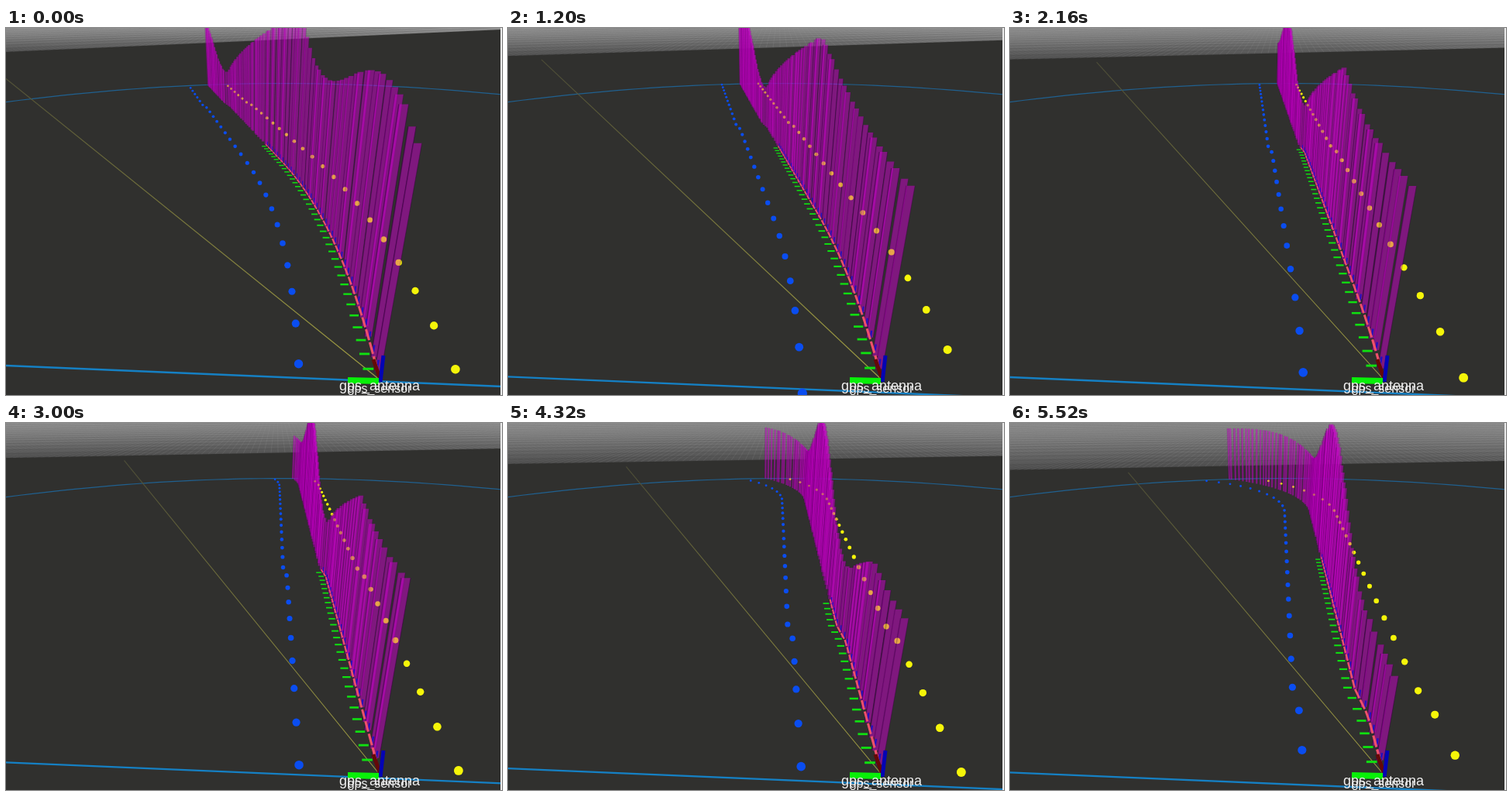
An HTML page with a canvas for the animation above (5.64 s loop, 640 by 474 pixels).

```html
<!DOCTYPE html>
<html lang="en">
<head>
<meta charset="utf-8">
<title>Track view</title>
<style>
  html, body { margin: 0; height: 100%; overflow: hidden; background: #30302e; }
  canvas { display: block; }
</style>
</head>
<body>
<canvas id="stage" width="640" height="474"></canvas>
<script>
const ctx = document.getElementById('stage').getContext('2d');
const W = 640, H = 474, LOOP = 5640, STEP = 120;
const CAR = { x: 2.07, z: 7.74 }, RANGE = 26.6, HALF_TRACK = 1.32;
const SEAM = 19.9, TURN = 35, SPACING = .335;

const clamp = (v, lo, hi) => Math.min(hi, Math.max(lo, v));
const random = i => { const v = Math.sin(i * 127.1 + 31.7) * 43758.5; return v - Math.floor(v); };

// The car rolls out: distance and its derivative, t in seconds
const travelled = t => -.29 + 3.96 * t - .0089 * t ** 3.5;
const carSpeed = t => 3.96 - .0311 * t ** 2.5;

// A bend that straightens, then a sharp left turn
const heading = s => clamp(.32 - .031 * s, 0, .31) - clamp((s - TURN) * .094, 0, 1.12);

// Centre line of the track, integrated from its heading
const DS = .05, S0 = -3, line = [];
for (let s = S0, x = 0, z = 0; s < 62; s += DS) {
  line.push({ x, z });
  x += Math.sin(heading(s)) * DS;
  z += Math.cos(heading(s)) * DS;
}

function trackPoint(s, offset = 0) {
  const f = (s - S0) / DS, i = Math.floor(f), a = line[i], b = line[i + 1], h = heading(s);
  return {
    x: a.x + (b.x - a.x) * (f - i) + Math.cos(h) * offset,
    z: a.z + (b.z - a.z) * (f - i) - Math.sin(h) * offset
  };
}

function conePosition(k) {
  if (k < 20) return 1.03 * k;
  return 20.3 + 1.07 * (k - 20) + .11 * Math.max(0, k - 33);
}

// Planned speed: accelerate from the current one, brake for the seam, then swing on
function plannedSpeed(s, t) {
  const u = s - travelled(t);
  if (s > SEAM) {
    const swing = Math.cos((s - 28) * 2 * Math.PI / 16.5);
    return 3.2 + 1.4 * swing * Math.exp(-Math.max(0, s - 28) / 8);
  }
  const wobble = 1.1 * Math.exp(-4 * t) * Math.cos((u - 2) * .55);
  const accelerating = Math.min(3.3, carSpeed(t)) - .1 * u + .045 * u * u + wobble;
  return Math.min(accelerating, Math.sqrt(3 + 2.1 * (SEAM - s)));
}

// Pitched pinhole camera: x to the right, z forward, h upward
function project(x, z, h = 0) {
  const w = z - .497 * h;
  return [(320 * z + 609 * x - 159 * h) / w, (3832 - 40 * z - 676 * h) / w];
}

function stroke(points, color, width) {
  ctx.beginPath();
  points.forEach(p => ctx.lineTo(...p));
  ctx.strokeStyle = color;
  ctx.lineWidth = width;
  ctx.stroke();
}

function dot(p, color) {
  ctx.beginPath();
  ctx.arc(...project(p.x, p.z), 46 / p.z, 0, 7);
  ctx.fillStyle = color;
  ctx.fill();
}

function drawFarGrid(left, right) {
  ctx.save();
  ctx.beginPath();
  [[0, 0], [W, 0], [W, right], [0, left]].forEach(p => ctx.lineTo(...p));
  ctx.clip();
  const shade = ctx.createLinearGradient(0, 0, 0, left);
  shade.addColorStop(0, '#949494');
  shade.addColorStop(1, '#484848');
  ctx.fillStyle = shade;
  ctx.fillRect(0, 0, W, left);
  for (let x = -900; x < 1600; x += 9)
    stroke([[x, left + (right - left) * x / W], [350, -40]], 'rgba(165,165,165,.22)', .7);
  for (let j = 0; j < 30; j++) {
    const k = 1 / (1 + j * .07);
    stroke([[0, (left + 40) * k - 40], [W, (right + 40) * k - 40]], 'rgba(40,40,40,.2)', .8);
  }
  ctx.restore();
}

function drawBar(p, height, seed) {
  const half = .05 + .02 * random(seed);
  const corners = [[-half, 0], [-half, height], [half, height], [half, 0]]
    .map(([dx, h]) => project(p.x + dx, p.z, h));
  ctx.beginPath();
  corners.forEach(c => ctx.lineTo(...c));
  ctx.fillStyle = 'rgba(205,0,205,.5)';
  ctx.fill();
  const edge = `rgba(50,0,60,${.2 + .4 * random(seed + .5)})`;
  stroke(corners.slice(0, 2), edge, 12 / p.z);
  stroke(corners.slice(2), edge, 8 / p.z);
}

function drawPose(p, next) {
  const at = project(p.x, p.z), size = 24 / p.z;
  stroke([project(p.x - .06, p.z), project(p.x - .24, p.z)], '#0fe010', size);
  stroke([at, project(p.x, p.z, .2)], '#2010c0', size * .8);
  stroke([at, project(next.x, next.z)], '#f0506a', size * 1.1);
}

function label(text, size, y) {
  ctx.font = `${size}px "Liberation Sans", Arial, sans-serif`;
  ctx.fillText(text, 482, y);
}

function draw(t) {
  const s0 = travelled(t), yaw = heading(s0) - .045, car = trackPoint(s0);
  const sin = Math.sin(yaw), cos = Math.cos(yaw);

  function view(s, offset = 0) {
    const p = trackPoint(s, offset - .12 * clamp((s - 19.5) / .8, 0, 1));
    const dx = p.x - car.x, dz = p.z - car.z;
    const x = dx * cos - dz * sin, z = dx * sin + dz * cos;
    return { x: x + CAR.x, z: z + CAR.z, near: Math.hypot(x, z) < RANGE };
  }
  function cones(offset, color) {
    for (let k = 0; k < 52; k++) {
      const s = conePosition(k), p = view(s, offset);
      if (s > s0 - 1.2 && p.near) dot(p, color);
    }
  }

  ctx.fillStyle = '#30302e';
  ctx.fillRect(0, 0, W, H);
  const left = 31 + 4 * t + .25 * t * t, right = 2 + 12.4 * t - .7 * t * t;
  drawFarGrid(left, right);

  const ring = [];
  for (let a = -1.2; a <= 1.2; a += .03)
    ring.push(project(CAR.x + RANGE * Math.sin(a), CAR.z + RANGE * Math.cos(a)));
  stroke(ring, '#20608f', 1.2);
  const axis = 445 - 9 * Math.cos(2 * Math.PI * t / 3.4);
  stroke([[0, axis], [W, axis + 27]], '#1580c4', 2.4);

  const originX = 125.5 - 600 * yaw, originY = left + (right - left) * originX / W + 6;
  const ray = ctx.createLinearGradient(originX, originY, 483, 455);
  ray.addColorStop(0, '#4c4c36');
  ray.addColorStop(1, '#a3a042');
  stroke([[originX, originY], [483, 455]], ray, 1.1);

  cones(HALF_TRACK, '#f5f50a');
  const phase = .85 + .16 * t;
  const planned = Math.max(Math.min(12.3, SEAM - s0), 1.4 * s0 - 15);
  for (let j = 150; j > -3; j--) {
    const s = SPACING * (j + phase + .6 * (random(j) - .5)), p = view(s);
    if (s > s0 + .05 && p.near) drawBar(p, plannedSpeed(s, t), j);
  }
  ctx.globalAlpha = .35;
  cones(HALF_TRACK, '#f5f50a');
  ctx.globalAlpha = 1;
  for (let j = 150; j > -3; j--) {
    const s = SPACING * (j + phase), u = s - s0;
    if (u > .22 && u < planned) drawPose(view(s), view(s + .28));
  }
  cones(-HALF_TRACK, '#0a4df0');

  // Vehicle axes and frame names
  stroke([[483, 454], [474, 428]], '#640808', 5);
  stroke([[483, 457], [487, 423]], '#0404b4', 5);
  stroke([[441, 455], [481, 456]], '#08f008', 8);
  ctx.fillStyle = '#f0f0f0';
  ctx.textAlign = 'center';
  label('gps_antenna', 18, 468);
  label('gps_sensor', 16, 471);

  ctx.fillStyle = '#e8e8e8';
  ctx.fillRect(638, 0, 2, H);
}

const start = performance.now();
function tick() {
  const t = (performance.now() - start) % LOOP;
  draw(Math.floor(t / STEP) * STEP / 1000);
  requestAnimationFrame(tick);
}
tick();
</script>
</body>
</html>
```
